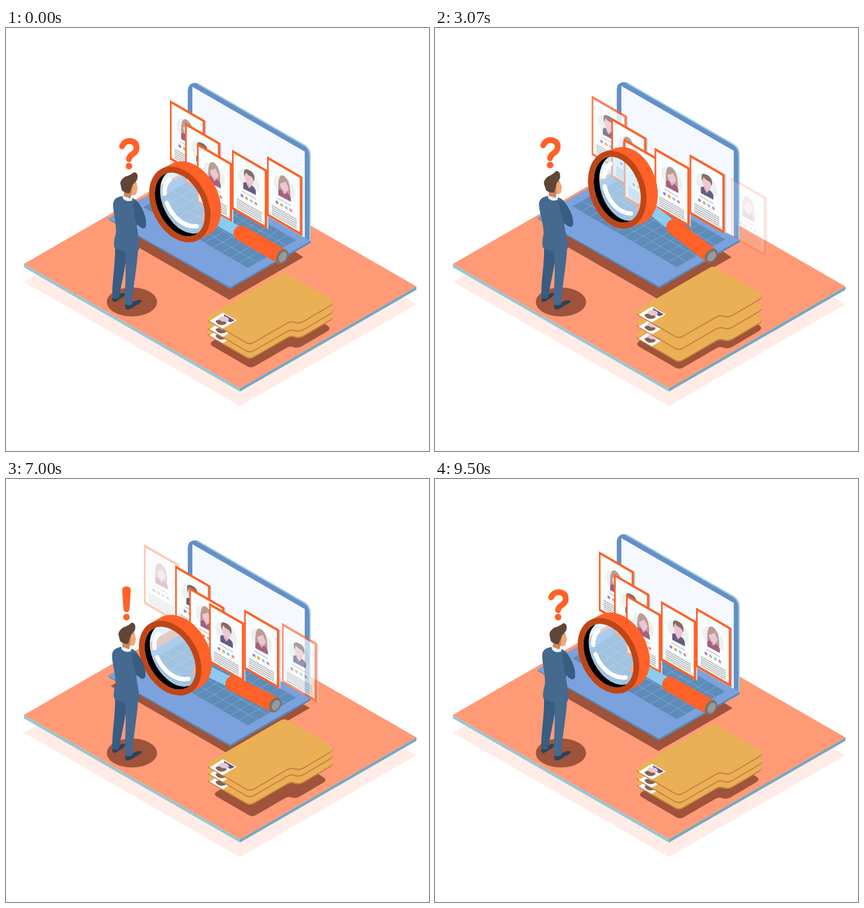
Animation, 640 px wide and 640 px high, one loop 9.57 s. Source, as an HTML page:

```html
<!DOCTYPE html>
<html lang="en">
<head>
<meta charset="utf-8">
<title>Candidate search</title>
<style>
  html, body { margin: 0; height: 100%; overflow: hidden; background: #fff; }
  svg { display: block; width: 100vw; height: 100vh; }
  .shade { fill: #9e533a; }
  .hot { fill: #ff6128; }
</style>
</head>
<body>
<svg viewBox="0 0 640 640">
  <defs>
    <path id="folder" d="M-6 -3.5 L-62 -36 Q-67 -40 -61 -44 L46 -106 Q52 -110 58 -106 L123 -68 Q128 -64 123 -60 L84 -37 C78 -33 73 -32 67 -34 Q62 -36 57 -33 L6 -3.5 Q0 0 -6 -3.5Z"/>
    <g id="file">
      <use href="#folder" y="2" fill="#c98040"/>
      <use href="#folder" fill="#eab056"/>
      <path d="M-61 -35 L-41 -47.500 L-20 -36 L-41 -23.500Z" fill="#fff"/>
      <path d="M-39 -45 L-23 -36 L-29 -33 Q-34 -34 -36 -38 Q-40 -41 -39 -45Z" fill="#5f577a"/>
      <ellipse cx="-40" cy="-37" rx="8" ry="5" fill="#ecc6d0"/>
      <path d="M-52 -35 Q-47 -39 -42 -34 Q-37 -35 -35 -32 Q-39 -28 -45 -29 Q-51 -31 -52 -35Z" fill="#806558"/>
    </g>
    <g id="sheet">
      <path d="M53 0 h2 v89 h-2z" fill="#b9d3e4"/>
      <path d="M0 0 H53 V90 H0Z" class="hot"/>
      <path d="M2.500 4 H49.500 V86 H2.500Z" fill="#f8fdfe"/>
      <circle cx="26" cy="32" r="16" fill="#edf0ef"/>
      <path d="M15 54 H36" stroke="#b9b9bd" stroke-width="1.200"/>
      <circle cx="15" cy="61" r="2.200" fill="#9a78e6"/>
      <circle cx="22" cy="61" r="2.200" fill="#f2a03c"/>
      <circle cx="29" cy="61" r="2.200" fill="#86c4ec"/>
      <circle cx="36" cy="61" r="2.200" fill="#f57f92"/>
      <path d="M7 70 H45 M7 73.200 H45 M7 76.400 H45 M7 79.600 H45 M7 82.800 H45" stroke="#b8b8b8" stroke-width="1.700"/>
    </g>
    <g id="man">
      <use href="#sheet"/>
      <path d="M17 49 V42 Q17 38 22 37 H29 Q35 37 36 42 V48Z" fill="#655d7c"/>
      <path d="M22 34 h7 v5 l-3.500 5 l-3.500 -5z" fill="#e2b3c2"/>
      <ellipse cx="26" cy="29.500" rx="6.500" ry="9.500" fill="#edc6d3"/>
      <path d="M19 30 Q16 19 22 17 Q30 14 33 19 Q35 24 33 29 Q32 25 30 24 Q24 25 21 22 Q20 26 19 30Z" fill="#846c60"/>
    </g>
    <g id="woman">
      <use href="#sheet"/>
      <path d="M17 41 Q16 15 26 15 Q36 17 35 41Z" fill="#bb9c93"/>
      <path d="M17 49 V43 Q17 39 22 38 H29 Q35 38 36 43 V48Z" fill="#a4607f"/>
      <path d="M22.500 33 h7 v5 l-3.500 5 l-3.500 -5z" fill="#e2b3c2"/>
      <ellipse cx="26" cy="29" rx="6.500" ry="9" fill="#edc6d3"/>
      <path d="M18 31 Q17 18 26 17 Q34 19 34 31 Q31 28 28 22 Q24 27 18 31Z" fill="#bb9c93"/>
    </g>
    <clipPath id="rim"><ellipse rx="33.500" ry="51.500"/></clipPath>
  </defs>

  <path d="M27 384 L294 230 L621 418 L354 572Z" fill="#ffece6"/>
  <path d="M27 357 L354 545 V550 L27 362Z" fill="#97c5d3"/>
  <path d="M621 391 L354 545 V550 L621 396Z" fill="#78a6c0"/>
  <path d="M27 357 L294 203 L621 391 L354 545Z" fill="#ff9a76"/>
  <ellipse cx="190.500" cy="414.500" rx="38" ry="22" class="shade"/>
  <path id="laptopShade" class="shade"/>
  <use id="folderShade" href="#folder" class="shade"/>

  <g id="laptop">
    <path d="M155 288 L277 218 L461 322 V325 L339 395 L157 291Z" fill="#5a87b7"/>
    <path d="M155 288 L277 218 L461 322 L339 392Z" fill="#7ca2dd"/>
    <path d="M208 271 L281 229 L439 321 L366 363Z" fill="#5e8bb8"/>
    <path id="keys" stroke="#7db0d8" stroke-width=".8"/>
    <path d="M277 218 V92 Q280 82 290 83 L453 177 Q461 183 461 192 V322Z" fill="#9fcbe0"/>
    <path d="M275 217 V94 Q276 83 286 83 L452 179 Q459 184 459 194 V321Z" fill="#6490c6"/>
    <path d="M282 89 L452 187 V317 L282 220Z" fill="#f5f9ff"/>
  </g>
  <g id="cards"></g>

  <g id="glass">
    <g transform="translate(318 289) rotate(29.700)">
      <path d="M-20 -12 H-1 Q3 0 -1 13 H-20Z" class="hot"/>
      <path d="M2 -8 H42 V8 H2 Q-4 0 2 -8Z" fill="#8ccbef"/>
      <path d="M41 -11.500 L115 -12 V12 L41 11.500 Q32 9 32 0 Q32 -9 41 -11.500Z" class="hot"/>
      <ellipse cx="115" rx="8.500" ry="12" fill="#737373"/>
      <ellipse cx="116" rx="5.500" ry="8.500" fill="#999"/>
    </g>
    <g transform="translate(263 267) rotate(-27)" fill-rule="evenodd">
      <path id="lens" fill="#cfeafa" opacity=".6"/>
      <path id="inside" clip-path="url(#rim)"/>
      <path id="body" class="hot"/>
      <path id="front" fill="#bd4618"/>
      <path d="M-16.500 -11 C-19 12 -10 34 8 41 M-13 -25 Q-8 -37 3 -40.500" fill="none" stroke="#fff" stroke-width="6.500" stroke-linecap="round"/>
    </g>
  </g>

  <use id="file0" href="#file"/>
  <use id="file1" href="#file"/>
  <use id="file2" href="#file"/>

  <path d="M161 407 L172 403 Q177 399 180 402 Q181 406 172 410 Q164 417 161 413Z" fill="#2c4259"/>
  <path d="M180 418 L190 416 Q199 410 205 412 Q207 415 196 420 Q186 428 181 425Z" fill="#2c4259"/>
  <path d="M165 326 L184 333 C181 362 175 385 171 408 Q165 411 161 408 C160 382 166 360 165 326Z" fill="#385c82"/>
  <path d="M180 331 L200 330 C199 360 192 390 191 418 Q185 421 180 418 C179 395 183 370 180 331Z" fill="#45698f"/>
  <g id="torso">
    <path d="M162 268 C162 257 170 255 178 254 L193 258 C202 262 204 270 206 282 L198 300 C200 316 203 326 201 336 Q183 343 164 332 Q162 325 166 312 C168 300 163 285 162 268Z" fill="#45698f"/>
    <path d="M192 264 Q199 262 204 270 Q213 285 212 299 Q211 304 206 303 Q196 298 195 286Z" fill="#385c82"/>
    <path d="M176 252 L191 256 L191 261 Q182 264 177 258Z" fill="#e9f1f7"/>
    <g id="head">
      <path d="M180 238 L193 230 Q198 233 198 238 L199 243 L197 251 Q194 254 190 252 L188 258 L178 254Z" fill="#ce875b"/>
      <path d="M192 236 Q198 233 198 238 L199 243 L197 251 Q194 254 190 252Z" fill="#f0a878"/>
      <path d="M173 235 Q173 230 180 225 Q188 223 194 218 Q200 219 199 226 Q199 231 194 234 Q191 238 190 242 L187 250 Q179 250 175 245Z" fill="#5f4637"/>
    </g>
  </g>

  <g id="ask">
    <path d="M175.500 179 Q179 171 187 171 Q197.500 172 197.500 181 Q197.500 187 192 190.500 Q186.500 194 186 198.500" fill="none" stroke="#ff6128" stroke-width="8.800" stroke-linecap="round"/>
    <circle cx="186" cy="209" r="5" class="hot"/>
  </g>
  <g id="aha" class="hot">
    <path d="M180 169 Q180 163 186.500 163 Q193 163 193 169 L191 198 Q190 202 186.500 202 Q183 202 182 198Z"/>
    <circle cx="186.500" cy="209.500" r="5"/>
  </g>
</svg>
<script>
const LOOP = 9.57, HALF = LOOP / 2, SECOND = HALF + .1;
const $ = id => document.getElementById(id);
const move = (id, value) => $(id).setAttribute('transform', value);
const draw = (id, d) => $(id).setAttribute('d', d);
const clamp = v => Math.min(1, Math.max(0, v));
const wave = (t, peak) => Math.cos((t - peak) * 2 * Math.PI / LOOP);
const ease = u => u < .5 ? 4 * u ** 3 : 1 - 4 * (1 - u) ** 3;
const oval = (cx, rx, ry) =>
  `M${cx} ${-ry}A${rx} ${ry} 0 0 1 ${cx} ${ry}A${rx} ${ry} 0 0 1 ${cx} ${-ry}Z`;

// time, lens x, lens y, lens turn, lean of the man
const poses = [
  [0, 263, 267, 0, 0],
  [2, 280, 252.5, 6.4, .85],
  [4.21, 267, 240, 8.5, 1],
  [5.86, 255, 254, 3.6, .85],
  [7, 248.5, 271, -3, .35],
  [8.43, 255, 271, -2.2, 0]
];
// card stops relative to the laptop
const stops = [[188, 78], [248, 109], [271, 143], [289, 174], [342, 184], [395, 194], [460, 234]];

const hole = oval(0, 33.5, 51.5), pane = oval(9, 33.5, 51.5);
draw('lens', pane);
$('lens').setAttribute('clip-path', 'url(#rim)');
draw('inside', 'M-50 -70H60V70H-50Z' + pane);
draw('body', 'M0 -60.5H18A42 60.5 0 0 1 18 60.5H0A42 60.5 0 0 1 0 -60.5Z' + hole);
draw('front', oval(0, 42, 60.5) + hole);

let grid = '';
for (let i = 1; i < 5; i++) grid += `M${208 + 14.6 * i} ${271 - 8.4 * i}l158 92`;
for (let i = 1; i < 12; i++) grid += `M${208 + 13.17 * i} ${271 + 7.67 * i}l73 -42`;
draw('keys', grid);

const cards = stops.slice(1).map(() => {
  const card = document.createElementNS('http://www.w3.org/2000/svg', 'use');
  return $('cards').appendChild(card);
});

// Smooth closed curve through the poses
function poseAt(t) {
  const n = poses.length;
  const key = i => {
    const turn = Math.floor(i / n), [time, ...rest] = poses[i - turn * n];
    return [time + turn * LOOP, ...rest];
  };
  let i = n - 1;
  while (poses[i][0] > t) i--;
  const [a, b, c, d] = [-1, 0, 1, 2].map(k => key(i + k));
  const span = c[0] - b[0], u = (t - b[0]) / span;
  return b.slice(1).map((v, j) => {
    const k = j + 1;
    const m0 = (c[k] - a[k]) / (c[0] - a[0]) * span;
    const m1 = (d[k] - b[k]) / (d[0] - b[0]) * span;
    const gap = c[k] - v;
    return v + u * (m0 + u * (3 * gap - 2 * m0 - m1 + u * (m0 + m1 - 2 * gap)));
  });
}

function pop(id, scale, lean) {
  move(id, `translate(${186.5 - 12 * lean} ${190 - 1.5 * lean}) scale(${scale}) translate(-186.5 -190)`);
}

function render(t) {
  const float = wave(t, 6.48), dy = 3.2 + 7 * float, low = (float + 1) / 2;
  move('laptop', `translate(0 ${dy})`);

  const tip = 409 + 8 * low, left = 172 - 14 * low, right = 446 + 14 * low;
  const side = tip - (338 - left) * .577;
  draw('laptopShade', `M338 ${tip}L${left} ${side}l122 -70L${right} ${tip - (right - 338) * .577}Z`);

  const shift = t < SECOND ? 0 : 1;
  const p = ease(clamp((t - shift * SECOND) / HALF));
  cards.forEach((card, i) => {
    const [x, y] = stops[i].map((v, k) => v + (stops[i + 1][k] - v) * p);
    card.setAttribute('href', (i + shift) % 2 ? '#woman' : '#man');
    card.setAttribute('transform', `matrix(1 .577 0 1 ${x} ${y + dy})`);
    card.setAttribute('opacity', i === 0 ? p : i === 5 ? 1 - p : 1);
  });

  const [x, y, turn, lean] = poseAt(t);
  move('glass', `translate(${x} ${y}) rotate(${turn}) translate(-263 -267)`);

  const base = wave(t, 2.2), size = .94 + .058 * base;
  move('folderShade', `translate(${400 - 31 * size} ${514.7 + 3 * base}) scale(${size})`);
  move('file0', `translate(369 ${499.5 + 6.5 * base})`);
  move('file1', `translate(369 ${485.8 + 6.3 * wave(t, 1)})`);
  move('file2', `translate(369 ${472 + 6.3 * wave(t, 9.5)})`);

  move('torso', `translate(0 ${-lean}) rotate(${-3.8 * lean} 185 340)`);
  move('head', `rotate(${-4 * lean} 183 256)`);

  const step = .45;
  const ask = t < HALF ? 1 - clamp((t - 3.31) / step) : clamp((t - 8.545) / step);
  const aha = t < HALF ? clamp((t - 3.76) / step) : 1 - clamp((t - 8.095) / step);
  pop('ask', ask, lean);
  pop('aha', aha, lean);
}

function tick() {
  render(performance.now() / 1000 % LOOP);
  requestAnimationFrame(tick);
}
tick();
</script>
</body>
</html>
```
